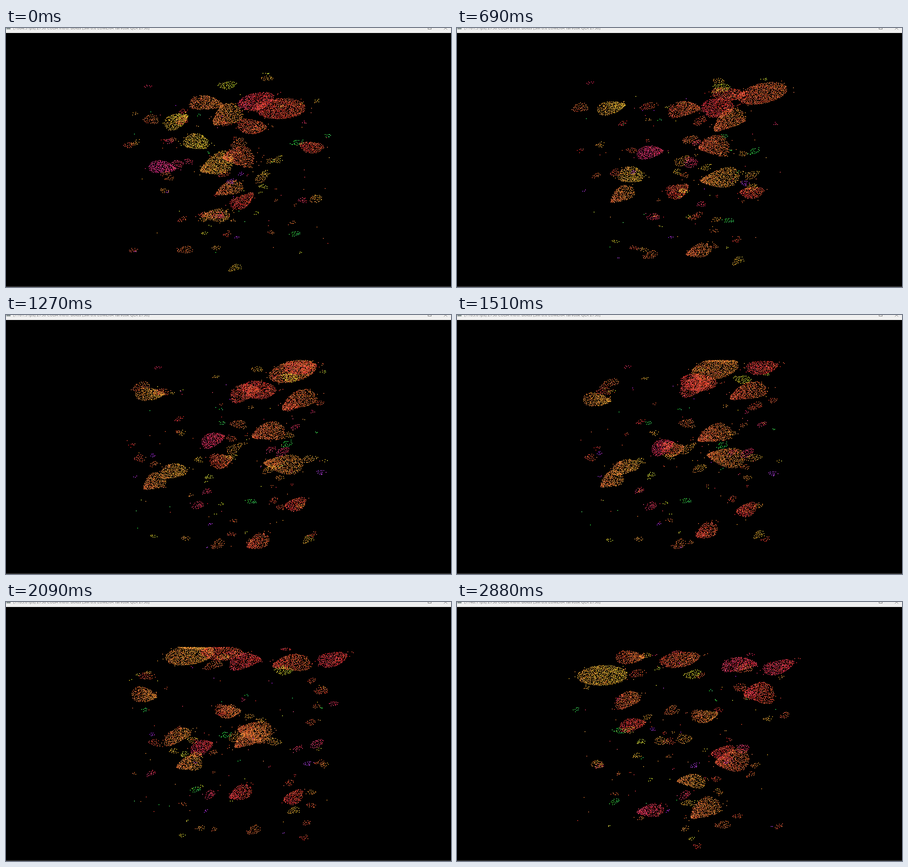
Write an HTML page with a canvas that moves like this. It is 980 px wide and 571 px high and loops after 2.9 s.

```html
<!DOCTYPE html>
<html lang="en">
<head>
<meta charset="utf-8">
<title>Boids</title>
<style>
html, body { margin: 0; width: 100%; height: 100%; overflow: hidden; background: #000; }
canvas { display: block; }
</style>
</head>
<body>
<canvas id="stage" width="980" height="571"></canvas>
<script>
const ctx = document.getElementById('stage').getContext('2d');
const LOOP = 2900, STEP = 29, LAST = 99;
const KEYS = [0, 36, 72, LAST];   // steps at which a flock passes its four way points
const CEILING = 99;
const TAU = Math.PI * 2;
const flocks = [];

function rng(seed) {
  return () => {
    seed = (seed + 0x6D2B79F5) | 0;
    let v = Math.imul(seed ^ (seed >>> 15), 1 | seed);
    v = (v + Math.imul(v ^ (v >>> 7), 61 | v)) ^ v;
    return ((v ^ (v >>> 14)) >>> 0) / 4294967296;
  };
}

// Evenly spaced but irregular points in the unit disk: keep the loneliest candidate
function spread(count, rand) {
  const pts = [];
  while (pts.length < count) {
    let best, gap = -1;
    for (let c = 0; c < 7; c++) {
      const a = rand() * TAU, r = Math.sqrt(rand());
      const u = r * Math.cos(a), v = r * Math.sin(a);
      let near = 9;
      for (const p of pts) near = Math.min(near, (p.u - u) ** 2 * 4 + (p.v - v) ** 2);
      if (near > gap) { gap = near; best = { u, v }; }
    }
    pts.push(best);
  }
  return pts;
}

// A flock of mean radius `size` whose hue drifts while it passes four points
function flock(size, hueFrom, hueTo, ...path) {
  const rand = rng(flocks.length * 97 + 11);
  const room = size > 14 ? 6.5 : 11;
  const count = Math.max(1, Math.round(Math.PI * size * size / room));
  const taper = (rand() - 0.5) * 1.1, bend = (rand() - 0.5) * 0.9;
  const dots = spread(count, rand).map(({ u, v }) => {
    const tail = rand() < 0.06 ? 1.45 : 1;
    return {
      u: u * tail,
      v: v * (1 + taper * u) + bend * (u * u - 0.3),
      hue: u * 5 + (rand() - 0.5) * 18,
      light: 56 + rand() * 12
    };
  });
  flocks.push({ size, hueFrom, hueTo, path, dots, phase: rand() * TAU });
}

// The large flocks
flock(35,   8,  40, [605, 177], [670, 130], [405, 115], [320, 161]);
flock(27,  -5,  14, [550, 160], [572, 174], [475, 112], [490, 126]);
flock(24,  22, -10, [440, 165], [520, 178], [525, 130], [620, 137]);
flock(27,  26,   5, [485, 192], [635, 200], [628, 134], [665, 200]);
flock(23,  13,  -8, [540, 216], [625, 120], [718, 125], [707, 142]);
flock(21,  46,  16, [375, 204], [325, 168], [304, 204], [381, 121]);
flock(29,  36,  15, [463, 300], [612, 336], [547, 285], [605, 349]);
flock(27,  14,  23, [512, 283], [580, 255], [537, 298], [545, 455]);
flock(20, -26,   2, [343, 306], [450, 267], [430, 320], [385, 270]);
flock(22,  46,  18, [418, 250], [370, 344], [376, 295], [375, 215]);
flock(21,  22,  30, [490, 354], [325, 370], [402, 356], [515, 394]);
flock(20,  30, -10, [462, 412], [552, 509], [515, 420], [425, 459]);
flock(18,   8,   2, [672, 262], [640, 400], [633, 430], [585, 330]);
flock(20,   4,  24, [520, 380], [475, 340], [488, 240], [545, 250]);

// Small groups and stragglers circle the middle of the volume
const pick = rng(2024);
const hues = [10, 20, 34, 46, 0, -14, 62, -75, 130];
for (let i = 0; i < 125; i++) {
  const size = i < 38 ? 7 + 7 * pick() ** 2 : 1 + 5 * pick() ** 2;
  const hue = hues[Math.floor(pick() ** 1.5 * hues.length)];
  const turn = pick() * TAU, reach = 235 * Math.sqrt(pick());
  const y = 112 + 385 * pick(), rise = (pick() - 0.5) * 90;
  const orbit = KEYS.map(k => {
    const a = turn + k * 0.03;
    return [490 + reach * Math.cos(a), y + rise * Math.sin(a)];
  });
  flock(size, hue, hue + 10 * (pick() - 0.5), ...orbit);
}

function place(path, k) {
  let i = 0;
  while (i < KEYS.length - 2 && k >= KEYS[i + 1]) i++;
  const span = KEYS[i + 1] - KEYS[i], s = (k - KEYS[i]) / span;
  const slope = (n, c) => {
    const a = Math.max(n - 1, 0), b = Math.min(n + 1, KEYS.length - 1);
    return (path[b][c] - path[a][c]) / (KEYS[b] - KEYS[a]) * span;
  };
  return path[i].map((p, c) => p + (path[i + 1][c] - p) * s * s * (3 - 2 * s)
    + slope(i, c) * s * (1 - s) ** 2 - slope(i + 1, c) * s * s * (1 - s));
}

function drawFlock({ size, hueFrom, hueTo, path, dots, phase }, k) {
  const [x, y] = place(path, k);
  // flocks lie flat under the ceiling and lean gently elsewhere
  const flat = Math.max(0, 1 - (y - CEILING) / 90);
  const stretch = 1.38 + 0.3 * flat + 0.12 * Math.sin(phase + k * 0.06);
  const lean = (-0.18 + 0.3 * Math.sin(phase * 2 + k * 0.04)) * (1 - flat * 0.7);
  const c = Math.cos(lean), s = Math.sin(lean);
  const hue = hueFrom + (hueTo - hueFrom) * k / LAST;
  for (const d of dots) {
    const u = d.u * size * stretch, v = d.v * size / stretch;
    const px = Math.round(x + u * c - v * s);
    let py = y + u * s + v * c;
    if (py < CEILING) py = CEILING + (CEILING - py) * 0.5;
    ctx.fillStyle = `hsl(${(hue + d.hue + 360) % 360} 100% ${d.light}%)`;
    ctx.fillRect(px, Math.round(py), 1.6, 1.6);
  }
}

function drawWindow(k) {
  ctx.fillStyle = '#f0f0f0';
  ctx.fillRect(0, 0, 980, 11);
  ctx.fillStyle = '#303030';
  ctx.fillRect(0, 569, 980, 2);
  ctx.fillStyle = '#8a9693';
  ctx.fillRect(1, 0, 9, 3);

  const fps = k < 10 ? '1084.5' : k < 45 ? '1161.5' : k < 80 ? '1185.0' : '1148.1';
  ctx.fillStyle = '#777';
  ctx.font = '9px "Open Sans", "Noto Sans", sans-serif';
  ctx.fillText(`[${fps} fps] 2750 CUDA Intro: Boids [SM 8.6 LUMERA Tarvosk QLX 2750]`, 16, 3);

  ctx.strokeStyle = '#777';
  ctx.lineWidth = 1;
  ctx.strokeRect(929.5, -4.5, 7, 7);
  ctx.beginPath();
  ctx.moveTo(964.5, 3.5);
  ctx.lineTo(968, 0);
  ctx.lineTo(971.5, 3.5);
  ctx.stroke();
}

function draw(ms) {
  const k = Math.min(LAST, Math.floor((ms % LOOP) / STEP + 0.35));
  ctx.fillStyle = '#000';
  ctx.fillRect(0, 0, 980, 571);
  for (const f of flocks) drawFlock(f, k);
  drawWindow(k);
}

const start = performance.now();
function tick() {
  draw(performance.now() - start);
  requestAnimationFrame(tick);
}
tick();
</script>
</body>
</html>
```
